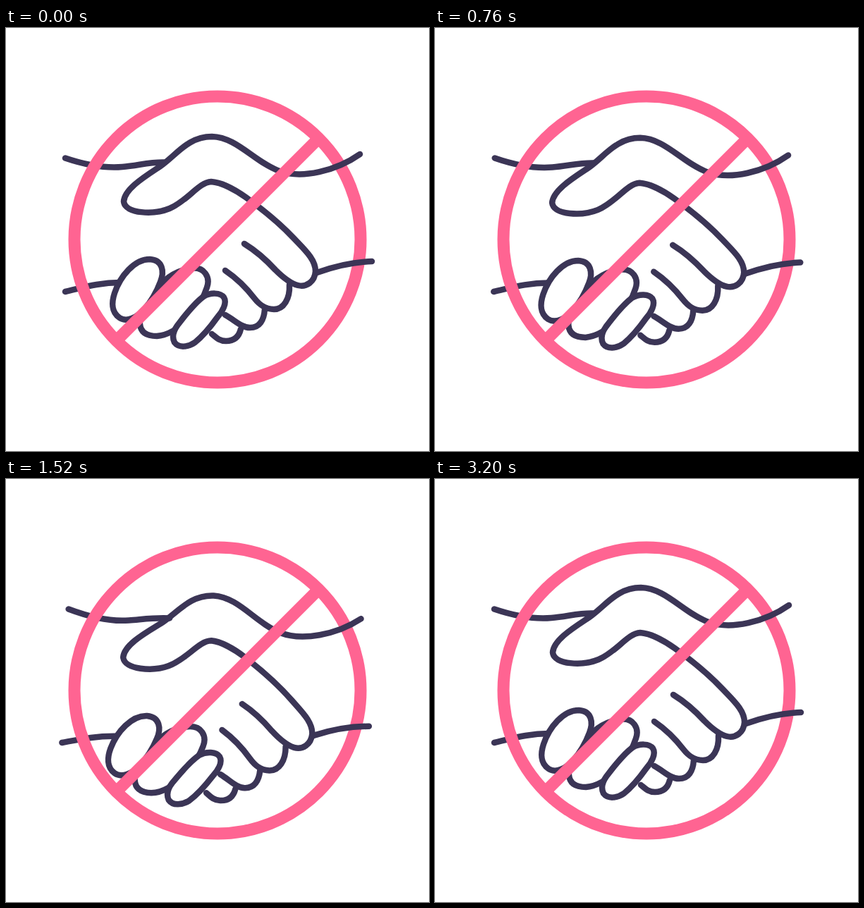
Write an HTML page that moves like this. It is 600 by 600 pixels and loops after 3.24 s.

```html
<!DOCTYPE html>
<html>
<head>
<meta charset="utf-8">
<style>
html, body { margin: 0; width: 100%; height: 100%; overflow: hidden; background: #fff; }
svg { display: block; width: 100vw; height: 100vh; }
path { fill: none; stroke: #3b3556; stroke-width: 8.5; stroke-linecap: round; stroke-linejoin: round; }
.finger path { fill: #fff; }
.sign { fill: none; stroke: #ff6492; stroke-width: 17; }
</style>
</head>
<body>
<svg viewBox="0 0 600 600">
  <path id="cuffTop"/>
  <path id="cuffLow"/>
  <circle class="sign" cx="300" cy="300" r="203"/>
  <g id="hands">
    <path d="M333 427C330 440 322 444 312 444C302 444 297 438 292 434"/>
    <path d="M367 399C366 414 360 425 346 425C334 425 324 414 311 407"/>
    <path d="M402 364C403 384 394 399 380 399C367 399 359 392 352 383C342 370 330 357 311 344"/>
    <path d="M502 179C468 203 420 214 388 203C352 190 328 155 292 154C258 154 242 180 219 196C198 210 168 228 167 246C169 264 210 265 232 256C258 245 273 219 291 218C306 219 326 230 340 240C365 258 392 281 408 298C424 315 439 328 439 345C438 360 426 368 414 365C402 362 391 352 382 343C370 330 356 317 338 306"/>
    <path d="M519 331C490 332 466 338 441 347"/>
    <g class="finger">
      <path d="M190 420C188 404 216 347 262 341C282 338 290 354 285 368C278 390 250 434 214 437C200 437 191 432 190 420Z"/>
      <path d="M243 422C252 410 268 390 280 381C290 375 304 375 309 382C314 390 307 402 300 410C290 424 278 438 268 446C258 453 245 454 239 446C235 438 238 429 243 422Z"/>
      <path d="M196 399C186 410 172 418 161 411C149 403 150 388 154 376C162 352 182 328 204 328C222 329 225 345 219 360C213 376 204 390 196 399Z"/>
    </g>
  </g>
  <line class="sign" x1="156.5" y1="443.5" x2="443.5" y2="156.5"/>
</svg>
<script>
const LOOP = 3240;
// [time in ms, value]
const lift = [[0, 0], [560, -12.5], [930, 12.7], [1240, -12.5], [1560, 12.5], [2000, 0]];
const tilt = [[0, 0], [560, -6], [950, 5.3], [1260, -5.6], [1660, 5], [2000, 0]];
const $ = id => document.getElementById(id);

function track(keys, t) {
  const i = keys.findIndex(k => k[0] > t);
  if (i < 0) return keys[keys.length - 1][1];
  const [t0, a] = keys[i - 1], [t1, b] = keys[i];
  return a + (b - a) * (1 - Math.cos(Math.PI * (t - t0) / (t1 - t0))) / 2;
}

function draw(t) {
  const p = track(lift, t), r = track(tilt, t);
  const at = (x, y, kx, ky) => `${x + kx * p} ${y + ky * p} `;
  $("hands").setAttribute("transform", `translate(${-.4 * p} ${p}) rotate(${r} 300 347)`);
  $("cuffTop").setAttribute("d", "M" + at(84, 184.5, .4, 0) +
    "C" + at(115, 195, .4, .1) + at(142, 199, .7, .3) + at(165, 197, .8, .3) +
    "S" + at(203, 190, .75, .55) + at(224, 190.5, .7, .6));
  $("cuffLow").setAttribute("d", "M" + at(84, 374, -.4, 0) +
    "C" + at(110, 368, -.4, .1) + at(132, 361, -.5, .3) + at(162, 361, -.55, .33));
}

const start = performance.now();
function frame() {
  draw((performance.now() - start) % LOOP);
  requestAnimationFrame(frame);
}
frame();
</script>
</body>
</html>
```
